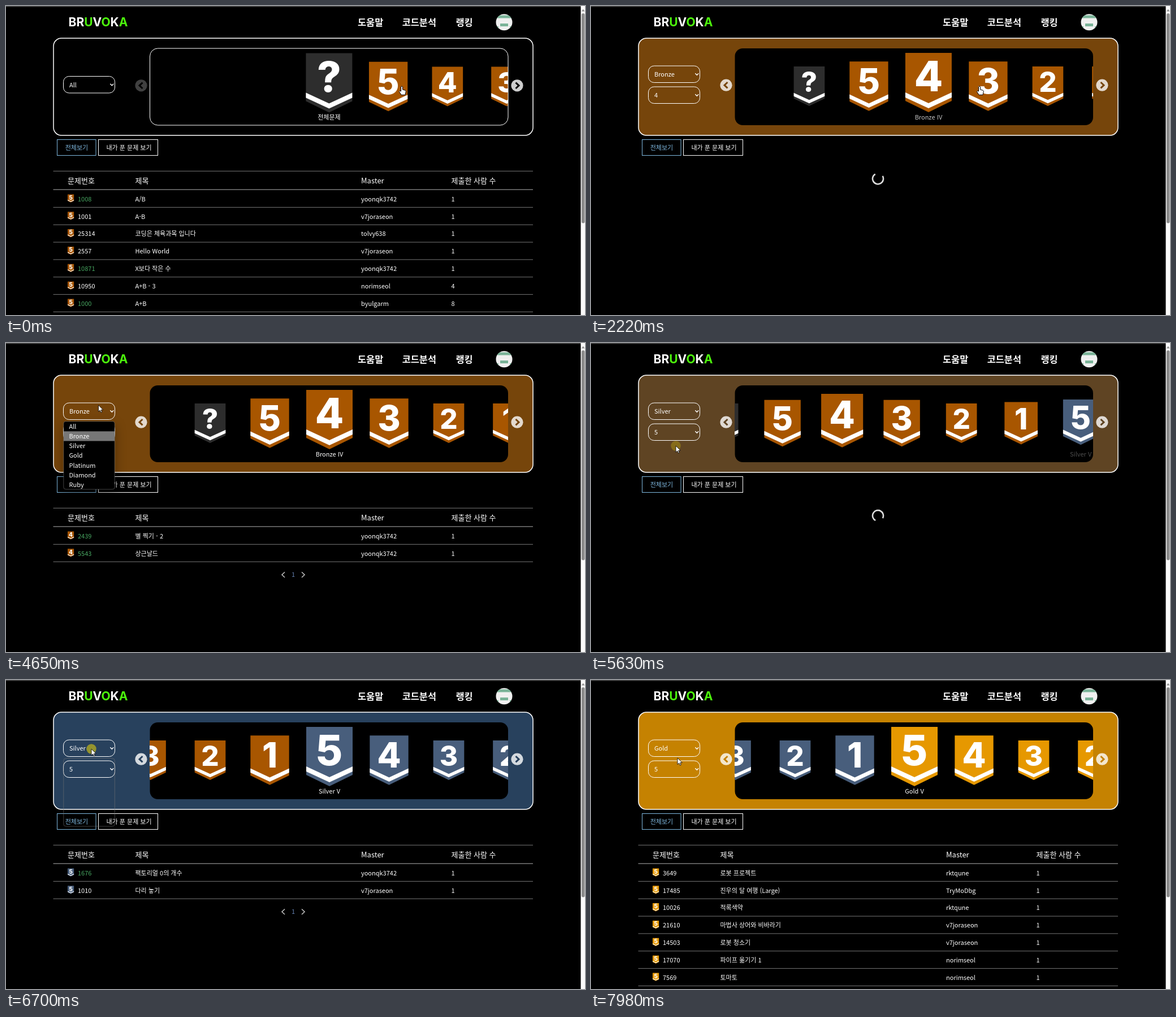
These frames come from a looping animation (1024x547 px, 8000 ms). An HTML page:

```html
<!DOCTYPE html>
<html lang="ko">
<head>
<meta charset="utf-8">
<title>Problem list</title>
<style>
html, body { margin: 0; width: 100%; height: 100%; overflow: hidden; background: #000; }
svg { display: block; width: 1024px; height: 547px; background: #000; }
text { font: 500 11px "Noto Sans CJK KR", "Noto Sans CJK", "Noto Sans", sans-serif; fill: #fff; white-space: pre; }
.logo { font: 700 21px Inter, sans-serif; }
.logo .on { fill: #4cf50c; }
.nav { font-size: 16.4px; font-weight: 700; }
.head { font-size: 13px; }
.digit { font: 800 74px Inter, sans-serif; text-anchor: middle; }
.mid { text-anchor: middle; }
.solved { fill: #48a862; }
.line { fill: none; stroke: #fff; }
.rule { stroke: #777; }
.rule.strong { stroke: #b4b4b4; }
.panel { fill: var(--panel); }
.chev { fill: none; stroke: var(--panel); stroke-width: 3; }
.pop { filter: drop-shadow(0 8px 10px rgba(0, 0, 0, .35)); }
</style>
</head>
<body>
<svg id="stage" viewBox="0 0 1024 547" xmlns="http://www.w3.org/2000/svg"></svg>
<script>
const COLORS = { All: '#2d2d2d', Bronze: '#a85600', Silver: '#485e7c', Gold: '#e69800' };
const PANELS = { All: '#000000', Bronze: '#76450b', Silver: '#28415d', Gold: '#c58201' };
const OPTIONS = ['All', 'Bronze', 'Silver', 'Gold', 'Platinum', 'Diamond', 'Ruby'];
const ROW = 30.85, OPTION = 17.15;

// Rows: number, title, master, count, solved
const LISTS = [
  { tier: 'Bronze', level: 5, rows: [
    [1008, 'A/B', 'yoonqk3742', 1, 1],
    [1001, 'A-B', 'v7joraseon', 1],
    [25314, '코딩은 체육과목 입니다', 'tolvy638', 1],
    [2557, 'Hello World', 'v7joraseon', 1],
    [10871, 'X보다 작은 수', 'yoonqk3742', 1, 1],
    [10950, 'A+B - 3', 'norimseol', 4],
    [1000, 'A+B', 'byulgarm', 8, 1]] },
  { tier: 'Bronze', level: 4, rows: [
    [2439, '별 찍기 - 2', 'yoonqk3742', 1, 1],
    [5543, '상근날드', 'yoonqk3742', 1, 1]] },
  { tier: 'Silver', level: 5, rows: [
    [1676, '팩토리얼 0의 개수', 'yoonqk3742', 1, 1],
    [1010, '다리 놓기', 'v7joraseon', 1]] },
  { tier: 'Gold', level: 5, rows: [
    [3649, '로봇 프로젝트', 'rktqune', 1],
    [17485, '진우의 달 여행 (Large)', 'TryMoDbg', 1],
    [10026, '적록색약', 'rktqune', 1],
    [21610, '마법사 상어와 비바라기', 'v7joraseon', 1],
    [14503, '로봇 청소기', 'v7joraseon', 1],
    [17070, '파이프 옮기기 1', 'norimseol', 1],
    [7569, '토마토', 'norimseol', 1]] }
];

// at: start of the change, load: [spinner on, list shown]
const STATES = [
  { at: -9999, index: 0, tier: 'All', label: '전체문제', list: 0, load: [0, 0], gap: 104.7 },
  { at: 1010, index: 1, tier: 'Bronze', level: 5, label: 'Bronze V', list: 0, load: [1060, 1590], gap: 105.5 },
  { at: 2000, index: 2, tier: 'Bronze', level: 4, label: 'Bronze IV', list: 1, load: [2040, 2340], gap: 105.5 },
  { at: 5560, index: 6, tier: 'Silver', level: 5, label: 'Silver V', list: 2, load: [5600, 5800], gap: 105.5 },
  { at: 7350, index: 11, tier: 'Gold', level: 5, label: 'Gold V', list: 3, load: [7390, 7720], gap: 105.5 }
];
const SCROLL = 430, CLICK = 200;
const CLICKS = [990, 1980, 4410, 5530, 6700, 7320];
const POPUPS = [[4410, 5560], [6700, 7350]];

// Pointer tip: time, x, y
const PATH = [
  [30, 700, 142], [220, 687, 142], [2420, 687, 142], [2750, 608, 143],
  [2790, 608, 143], [3150, 420, 112], [3570, 238, 245], [3600, 236, 243],
  [4120, 195, 91], [4380, 163.5, 110], [4810, 163.5, 110], [5370, 150, 182],
  [6130, 150, 182], [6530, 151, 122], [6720, 151, 122], [7180, 152, 198],
  [7620, 152, 198], [7960, 153, 138]
];

const clamp = v => Math.max(0, Math.min(1, v));
const lerp = (a, b, p) => a + (b - a) * p;
const easeOut = p => 1 - (1 - p) ** 2;
const smooth = p => p * p * (3 - 2 * p);

const text = (x, y, s, cls = '') => `<text x="${x}" y="${y}" class="${cls}">${s}</text>`;
const rect = (x, y, w, h, r, extra) => `<rect x="${x}" y="${y}" width="${w}" height="${h}" rx="${r}" ${extra}/>`;
const rule = (y, cls = '') => `<path d="M83.5 ${y}H932" class="rule ${cls}"/>`;

function badge(tier, mark) {
  return `<path d="M0 0H82V85L41 105 0 85Z" fill="${COLORS[tier]}"/>
    <path d="M0 70 41 89 82 70V79L41 98 0 79Z" fill="#fff"/>` + text(41, 68, mark, 'digit');
}

function listMarkup({ tier, level, rows }) {
  let out = rule(292.3) + rule(325, 'strong');
  [[109, '문제번호'], [228.5, '제목'], [628, 'Master'], [787.5, '제출한 사람 수']]
    .forEach(([x, s]) => out += text(x, 313.5, s, 'head'));
  rows.forEach(([num, title, master, count, solved], i) => {
    const y = 345.7 + i * ROW;
    out += `<g transform="translate(109 ${y - 12.3}) scale(.136)">${badge(tier, level)}</g>`
      + text(127, y, num, solved ? 'solved' : '') + text(228.5, y, title)
      + text(628, y, master) + text(787.5, y, count) + rule(356.4 + i * ROW);
  });
  if (rows.length < 7) {
    out += `<path d="M493 405.5 488 410.3 493 415M523 405.5 528 410.3 523 415" fill="none" stroke="#c4c4c4" stroke-width="1.5"/>
      <text x="508" y="414.3" class="mid" style="fill:#6583b5">1</text>`;
  }
  return `<g class="list">${out}</g>`;
}

const select = id => `<g id="${id}">${rect(101.5, -14.7, 91, 29.5, 10, 'class="line"')}
  ${text(112, 4.5, '')}<path d="M184.3-1.5 187.3 1.5 190.3-1.5" class="line" stroke-width="1.4"/></g>`;

const arrow = (id, x, dir) => `<g id="${id}"><circle cx="${x}" r="10.6" fill="#fff"/>
  <path d="M${x - 2.5 * dir}-5.2 ${x + 3 * dir} 0 ${x - 2.5 * dir} 5.2" class="chev"/></g>`;

const button = (id, x, w, tx, s, color) => `<g id="${id}">${rect(x, 236.5, w, 28, 0, `fill="none" stroke="${color}"`)}
  <text x="${tx}" y="254.7" style="fill:${color}">${s}</text></g>`;

const marks = [['All', '?']];
['Bronze', 'Silver', 'Gold'].forEach(tier => {
  for (let n = 5; n > 0; n--) marks.push([tier, n]);
});

const logo = [...'BRUVOKA'].map((c, i) => i > 1 && i % 2 === 0 ? `<tspan class="on">${c}</tspan>` : c).join('');

const stage = document.getElementById('stage');
stage.innerHTML = `
<defs>
  <clipPath id="window">${rect(254, 75, 634, 136, 14, '')}</clipPath>
  <clipPath id="round"><circle cx="881" cy="28.7" r="14.5"/></clipPath>
</defs>
<path d="M0 .7H1024" stroke="#484848" stroke-width="1.4"/>
${text(110.5, 36.3, logo, 'logo')}
${text(622, 35, '도움말', 'nav')}${text(700.7, 35, '코드분석', 'nav')}${text(795.5, 35, '랭킹', 'nav')}
<g clip-path="url(#round)"><path d="M866 14H896V44H866Z" fill="#f0f0f0"/>
  <path d="M866 16.5H896V21.5H866ZM874 31H888V36H874ZM866 36H871V41H866ZM891 36H896V41H891Z" fill="#7ab398"/></g>
${rect(84, 57, 848, 172, 14, 'class="panel" stroke="#fff" stroke-width="1.5"')}
${rect(254.5, 75, 633.5, 136, 14, 'id="box"')}
<g clip-path="url(#window)">${marks.map(m => `<g class="badge">${badge(...m)}</g>`).join('')}
  <text id="label" class="mid" y="200.5"></text></g>
${rect(254.5, 75, 633.5, 136, 14, 'id="frame" class="line"')}
${arrow('prev', 239, -1)}${arrow('next', 904, 1)}
${select('tier')}${select('level')}
${button('every', 90.5, 68.5, 104.7, '전체보기', '#7fb9e0')}
${button('mine', 163.5, 105, 177.5, '내가 푼 문제 보기', '#ffffff')}
${LISTS.map(listMarkup).join('')}
<path id="spinner" d="M6.7-6.7A9.5 9.5 0 1 0 6.7 6.7" fill="none" stroke="#ddd" stroke-width="2.6"/>
<g id="popup"><g id="menu" class="pop">${rect(102, 139, 90, 120, 3, 'fill="#000"')}
  <rect id="pick" x="102" width="90" height="${OPTION}" fill="#777"/>
  ${OPTIONS.map((s, i) => text(111.5, 152 + i * OPTION, s)).join('')}</g>
  ${rect(101.8, 138.8, 90.5, 120.2, 4, 'fill="none" stroke="#777" stroke-opacity=".55"')}</g>
<circle id="click" r="8.7" fill="#ffe600"/>
<g id="pointer" stroke="#000" fill="#fff" stroke-linejoin="round">
  <path id="hand" d="M-1.5 1Q0-1 1.5 1V6L6 7.2Q7.6 8 7.2 10L6 15.3H-1L-4.6 9.5Q-4-7.4-1.5 9Z"/>
  <path id="tip" d="M0 0V11.5L2.7 9 4.5 13 6.3 12.2 4.6 8.3H8.2Z" stroke-width=".8"/></g>
<path d="M1016.5 0H1024V547H1016.5Z" fill="#fafafa"/>
<path d="M1018 9.5 1020.7 5.5 1023.4 9.5Z" fill="#8a8a8a"/>
${rect(1018, 13, 5.5, 371.5, 2.7, 'fill="#8a8a8a"')}`;

const $ = id => document.getElementById(id);
$('hand').setAttribute('d', 'M-1.5 1Q0-1 1.5 1V6L6 7.2Q7.6 8 7.2 10L6 15.3H-1L-4.6 9.5Q-4.2 7.4-1.5 9Z');
const badges = [...document.querySelectorAll('.badge')];
const lists = [...document.querySelectorAll('.list')];
const show = (el, on) => { el.style.display = on ? '' : 'none'; };
const move = (el, x, y, more = '') => el.setAttribute('transform', `translate(${x} ${y}) ${more}`);

const sizeAt = d => Math.max(2 / 3, 1 - d / 6);
const midAt = d => d ? 142 : 135.5;

function pointerAt(t) {
  const i = PATH.findIndex(k => k[0] > t);
  if (i === 0) return PATH[0].slice(1);
  if (i < 0) return PATH[PATH.length - 1].slice(1);
  const a = PATH[i - 1], b = PATH[i], p = smooth((t - a[0]) / (b[0] - a[0]));
  return [lerp(a[1], b[1], p), lerp(a[2], b[2], p)];
}

function drawPanel(t, n) {
  const cur = STATES[n], old = STATES[Math.max(0, n - 1)];
  const p = easeOut(clamp((t - cur.at) / SCROLL)), q = smooth(clamp((t - cur.at) / 200));
  const gap = lerp(old.gap, cur.gap, p), center = lerp(old.index, cur.index, p);
  const dy = n ? 0 : .6, xAt = i => 572 + (i - center) * gap - dy;
  stage.style.setProperty('--panel', `color-mix(in srgb, ${PANELS[old.tier]}, ${PANELS[cur.tier]} ${q * 100}%)`);
  badges.forEach((el, i) => {
    const a = Math.abs(i - old.index), b = Math.abs(i - cur.index);
    const s = lerp(sizeAt(a), sizeAt(b), q), y = lerp(midAt(a), midAt(b), q) + dy;
    move(el, xAt(i) - 41 * s, y - 52.5 * s, `scale(${s})`);
  });
  $('label').textContent = cur.label;
  $('label').setAttribute('x', xAt(cur.index));
  $('label').style.opacity = p;
  show($('frame'), !n);
  ['prev', 'next'].forEach(id => move($(id), 0, 140.2 + dy));
  $('prev').style.opacity = n ? .8 : .25;
  $('next').style.opacity = .8;
  move($('tier'), 0, n ? 120.7 : 139.2);
  move($('level'), 0, 157.7);
  show($('level'), n);
  $('tier').querySelector('text').textContent = cur.tier;
  $('level').querySelector('text').textContent = cur.level || '';
}

function drawList(t, n) {
  const { load: [from, to], list } = STATES[n];
  const visible = t >= to ? list : t < from ? STATES[n - 1].list : -1;
  lists.forEach((el, i) => show(el, i === visible));
  show($('spinner'), visible < 0);
  move($('spinner'), 507.5, 305.7, `rotate(${(t - 1430) * .36})`);
}

function drawPointer(t, n) {
  const [x, y] = pointerAt(t);
  const onMine = t > 2800 && x > 192 && x < 269 && y > 236 && y < 265;
  const hand = t < 2830 || onMine;
  move($('pointer'), x, y);
  show($('hand'), hand);
  show($('tip'), !hand);
  $('mine').firstElementChild.setAttribute('stroke', onMine ? '#7fb9e0' : '#ffffff');
  $('mine').lastElementChild.style.fill = onMine ? '#7fb9e0' : '#ffffff';

  const hit = CLICKS.find(c => t >= c && t < c + CLICK);
  show($('click'), hit !== undefined);
  move($('click'), x, y);
  $('click').style.opacity = .5 * (1 - clamp((t - hit) / CLICK) || 0);

  const open = POPUPS.find(([a, b]) => t >= a && t < b);
  show($('popup'), open);
  if (!open) return;
  $('menu').style.opacity = clamp((t - open[0] - 10) / 120);
  const over = Math.floor((y - 139.2) / OPTION);
  const pick = over >= 0 && over < OPTIONS.length ? over : OPTIONS.indexOf(STATES[n].tier);
  // Keep the current tier marked until the pointer passes it
  const row = Math.max(pick, OPTIONS.indexOf(STATES[n].tier));
  $('pick').setAttribute('y', 139.2 + row * OPTION);
}

function draw(t) {
  const n = STATES.filter(s => s.at <= t).length - 1;
  drawPanel(t, n);
  drawList(t, n);
  drawPointer(t, n);
}

const start = performance.now();
function tick() {
  draw((performance.now() - start) % 8000);
  requestAnimationFrame(tick);
}
draw(0);
requestAnimationFrame(tick);
</script>
</body>
</html>
```
